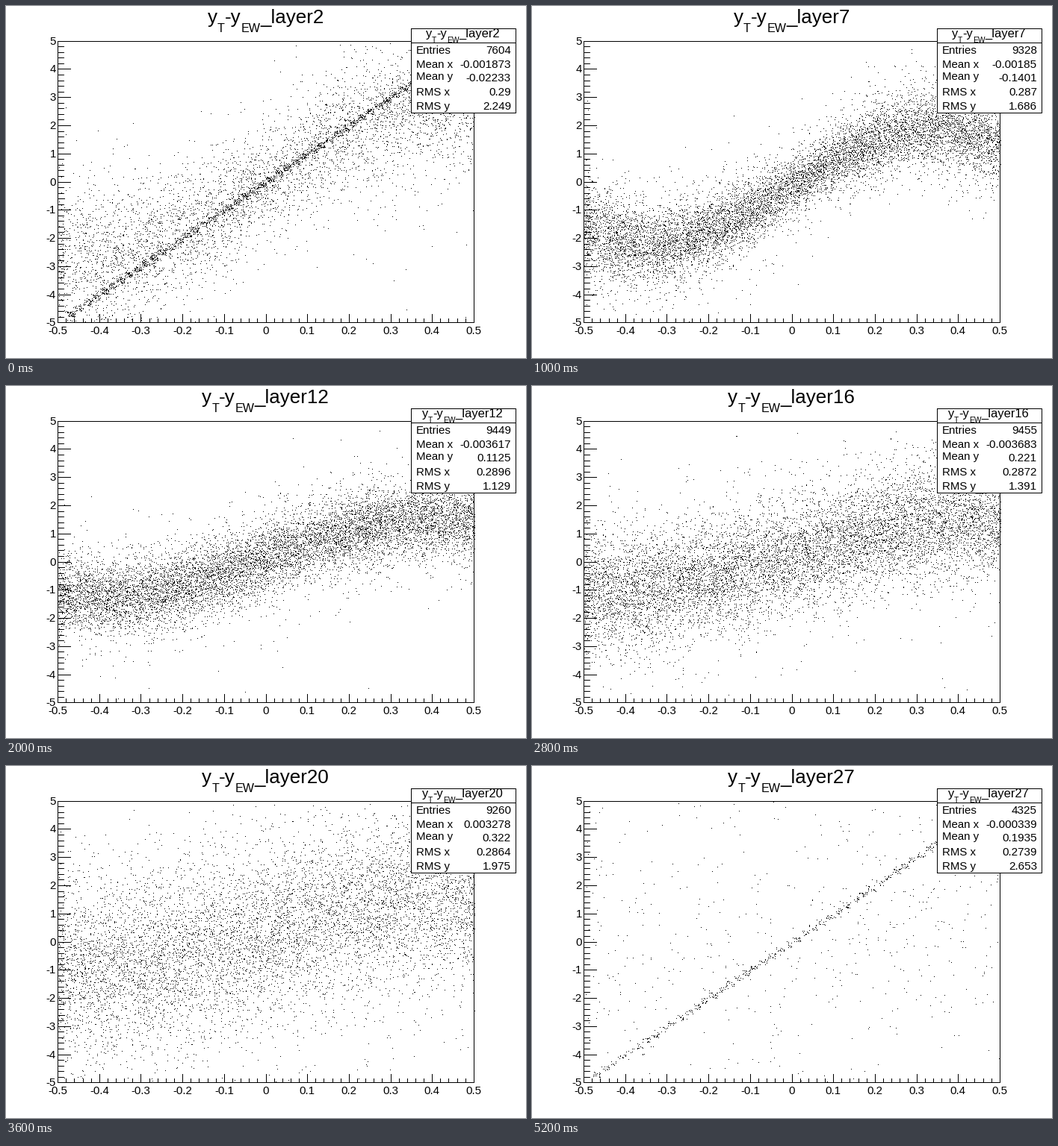
Animation, 696 px wide and 472 px high, one loop 5300 ms. Source, as a matplotlib script:

```python
import numpy as np
import matplotlib.pyplot as plt
from matplotlib.animation import FuncAnimation
from matplotlib.patches import Rectangle
from matplotlib.textpath import TextPath

W, H, DPI = 696, 472, 64
PT = 72 / DPI  # points per pixel
FONT = "Liberation Sans"
LEFT, RIGHT, TOP, BOTTOM = 69, 626, 47, 424
BINS = 50
FIRST, LAST = 2, 27

NAMES = ["Entries", "Mean x", "Mean y", "RMS x", "RMS y"]
# Readings at a few layers; the others are interpolated
READINGS = {
    2: (7604, -0.001873, -0.02233, 0.29, 2.249),
    7: (9328, -0.00185, -0.1401, 0.287, 1.686),
    12: (9449, -0.003617, 0.1125, 0.2896, 1.129),
    16: (9455, -0.003683, 0.221, 0.2872, 1.391),
    20: (9260, 0.003278, 0.322, 0.2864, 1.975),
    24: (6270, 0.001045, 0.246, 0.2785, 2.489),
    27: (4325, -0.000339, 0.1935, 0.2739, 2.653),
}


def readings(layer):
    return [np.interp(layer, list(READINGS), col) for col in zip(*READINGS.values())]


def px(x):
    return W * (0.5 + 0.8 * x)


def py(y):
    return H * (0.5 - 0.08 * y)


def logistic(v):
    return 1 / (1 + np.exp(-v))


def cloud(layer, rng):
    """Wavy cloud: steep in early layers, tight in the middle, diffuse later."""
    n = int(9400 * logistic(layer - 2) * logistic(0.6 * (22.7 - layer)))
    amp = 1.3 + 1.5 * np.exp(-((layer - 2) / 6) ** 2)
    freq = 3.2 + 1.4 * np.exp(-((layer - 8) / 4.5) ** 2)
    spread = 0.64 * np.exp(0.115 * max(7 - layer, layer - 12.5, 0))
    flare = 0.35 * logistic(9.5 - layer)
    x = rng.uniform(-0.5, 0.5, n)
    width = spread * (1 - flare + 2 * flare * np.sqrt(np.abs(x)))
    y = readings(layer)[2] + amp * np.sin(freq * x) + width * rng.standard_t(7, n)
    keep = np.abs(y) < 5
    return x[keep], y[keep]


def scatter(layer, step):
    """Bin the samples, then spread each one at random inside its cell."""
    rng = np.random.default_rng(layer)
    x, y = cloud(layer, rng)
    n = int(1700 * np.exp(1.2 * (FIRST - layer)) + 680 * np.exp(0.35 * (layer - LAST)))
    diag = rng.integers(1, BINS, n)
    col = np.append(np.floor((x + 0.5) * BINS), diag)
    row = np.append(np.floor((y + 5) * BINS / 10), diag)
    jitter = np.random.default_rng(100 + step).random((2, col.size))
    u = (col + jitter[0]) / BINS - 0.5
    v = (row + jitter[1]) * 10 / BINS - 5
    return np.floor(px(u)) + 0.5, np.floor(py(v)) + 0.5


def advance(s, size):
    def ink(t):
        return TextPath((0, 0), t, size=size, prop={"family": FONT}).get_extents().width
    return ink("|" + s + "|") - ink("||")


fig = plt.figure(figsize=(W / DPI, H / DPI), dpi=DPI, facecolor="white")
ax = fig.add_axes([0, 0, 1, 1])
ax.set(xlim=(0, W), ylim=(H, 0))
ax.axis("off")


def label(x, y, s, size=15, ha="left"):
    return ax.text(x, y, s, fontsize=size * PT, family=FONT, ha=ha,
                   va="baseline", color="black", zorder=6)


def line(x0, y0, x1, y1, z=3):
    ax.plot([x0, x1], [y0, y1], color="black", lw=PT, antialiased=False,
            solid_capstyle="projecting", zorder=z)


def box(x0, y0, x1, y1, z, fill="none"):
    ax.add_patch(Rectangle((x0, y0), x1 - x0, y1 - y0, facecolor=fill,
                           edgecolor="black", lw=PT, antialiased=False, zorder=z))


class Title:
    """Centred heading with two subscripts."""

    def __init__(self, cx, base, size, drop):
        self.cx = cx
        self.sizes = [size * (0.62 if i % 2 else 1) for i in range(5)]
        self.parts = [label(0, base + drop * (i % 2), "", s)
                      for i, s in enumerate(self.sizes)]

    def show(self, layer):
        words = ["y", "T", "-y", "EW", f"_layer{layer}"]
        widths = [advance(w, s) for w, s in zip(words, self.sizes)]
        x = self.cx - sum(widths) / 2
        for part, word, width in zip(self.parts, words, widths):
            part.set_text(word)
            part.set_x(x)
            x += width


dots, = ax.plot([], [], ",", color="black", antialiased=False, zorder=2)

box(LEFT, TOP, RIGHT, BOTTOM, 3)
for i in range(BINS + 1):
    major = i % 5 == 0
    tx = int(px(i / BINS - 0.5))
    ty = int(py(i / 5 - 5))
    line(tx, BOTTOM, tx, BOTTOM - (11 if major else 5))
    line(LEFT, ty, LEFT + (17 if major else 8), ty)
    if major:
        k = i // 5 - 5
        label(tx, 440, f"{k / 10:g}", ha="center")
        label(67, ty + 5, str(k), ha="right")

box(542, 30, 682, 143, 4, "white")
line(542, 49, 682, 49, 5)
values = []
for i, name in enumerate(NAMES):
    base = 64 + 18.7 * i
    label(549, base - 2 * (name == "Mean y"), name)
    values.append(label(676, base, "", 15.3, "right"))

titles = [Title(347.5, 23, 26, 12), Title(611, 42, 16.5, 7)]


def update(frame):
    step = frame // 2
    layer = min(FIRST + step, LAST)
    dots.set_data(*scatter(layer, step))
    for title in titles:
        title.show(layer)
    for text, v in zip(values, readings(layer)):
        text.set_text(f"{v:.0f}" if v > 100 else f"{v:.4g}")
    return [dots]


anim = FuncAnimation(fig, update, frames=53, interval=100, repeat=True,
                     repeat_delay=0, blit=False)
plt.show()
```
